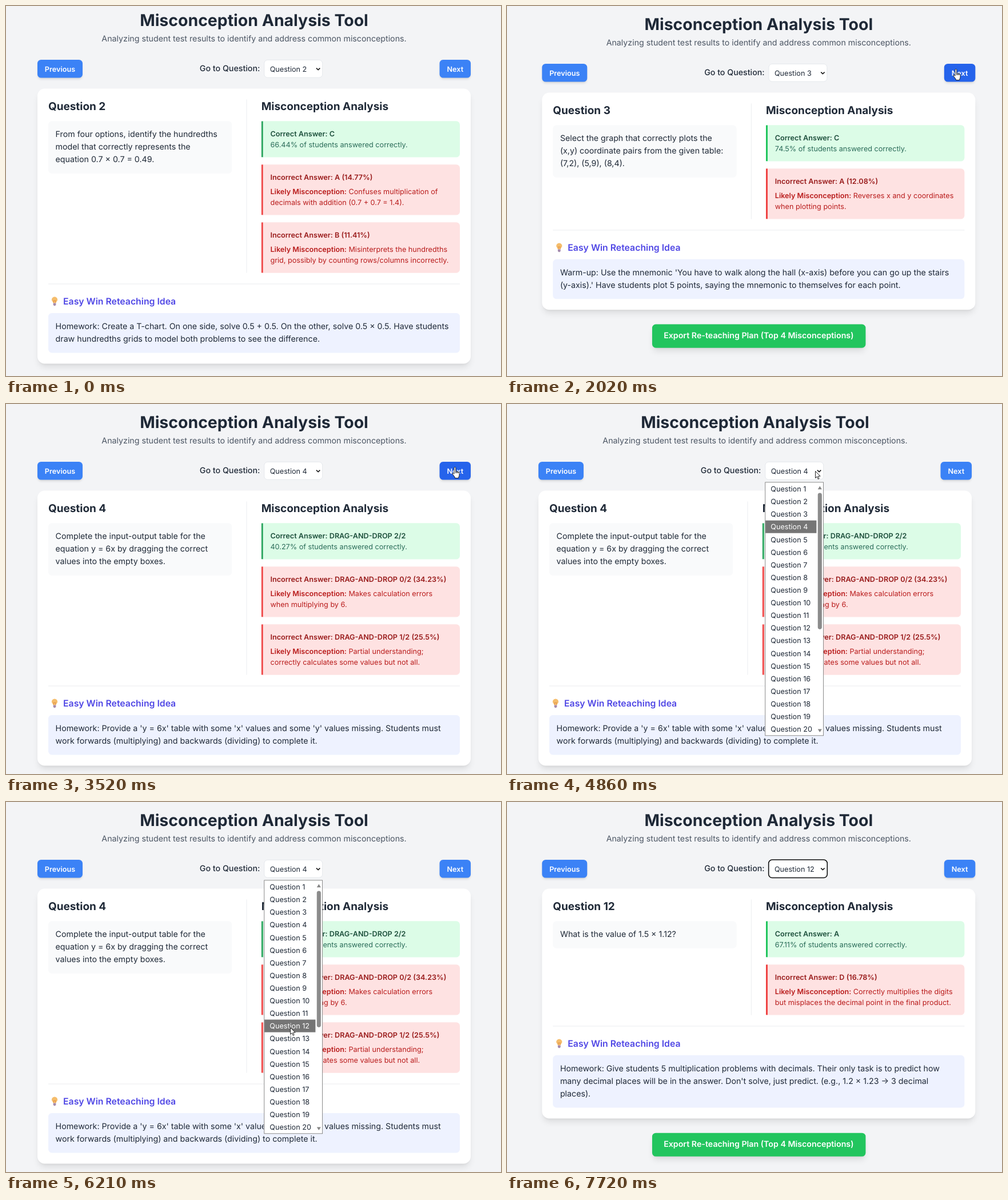
Recreate the animation shown at these times as an HTML page. Size 866x647 px, loop 8000 ms.

```html
<!DOCTYPE html>
<html lang="en">
<head>
<meta charset="utf-8">
<title>Misconception Analysis Tool</title>
<style>
* { box-sizing: border-box; margin: 0; }
html, body { width: 100%; height: 100%; overflow: hidden; }
body { position: relative; background: #f3f4f6; color: #1f2937; font: 18px/28px Inter, sans-serif; text-rendering: geometricPrecision; white-space: nowrap; }
#page { position: absolute; left: 0; top: 0; width: 960px; transform-origin: 0 0; --edge: #22c55e; }
#page.tall { --edge: #27a35c; }
h1 { font-size: 36px; line-height: 40px; text-align: center; }
.sub { margin: 8px 0 32px; text-align: center; color: #4b5563; }
nav { position: relative; height: 40px; margin-bottom: 24px; }
nav > * { position: absolute; top: 0; height: 40px; line-height: 40px; }
.btn { border-radius: 8px; background: #3b82f6; color: #fff; font-size: 16px; font-weight: 600; text-align: center; box-shadow: 0 4px 6px -1px #0000001a, 0 2px 4px -2px #0000001a; }
.btn.hover { background: #2563eb; }
.label { right: 467px; font-weight: 500; }
.select { left: 502px; width: 130px; padding-left: 12px; border: 1px solid #e0e3e8; border-radius: 8px; background: #fff; font-size: 16px; line-height: 38px; }
.select.focus { outline: 2px solid #111; outline-offset: -1px; }
.select svg { position: absolute; right: 3px; top: 15px; }
.card { padding: 24px; border-radius: 16px; background: #fff; box-shadow: 0 10px 15px -3px #0000001a, 0 4px 6px -4px #0000001a; }
.cols { display: grid; grid-template-columns: 440px 440px; gap: 32px; }
.left { padding-right: 32px; border-right: 1px solid #e5e7eb; }
h2 { margin-bottom: 16px; font-size: 24px; line-height: 32px; }
.box { padding: 16px; border-radius: 8px; background: #f9fafb; }
.answer { padding: 16px; border-left: 4px solid #ef4444; border-radius: 0 8px 8px 0; background: #fee2e2; color: #b91c1c; font-size: 16px; line-height: 24px; }
.answer + .answer { margin-top: 16px; }
.answer b { font-weight: 600; }
.answer .title { margin-bottom: 8px; color: #991b1b; font-weight: 600; }
.answer.right { border-color: var(--edge); background: #dcfce7; color: #2a6b58; }
.answer.right .title { margin: 0; color: #1d4f3c; }
.idea { margin-top: 24px; padding-top: 24px; border-top: 1px solid #e5e7eb; }
h3 { position: relative; margin-bottom: 12px; padding-left: 33px; color: #4f46e5; font-size: 20px; font-weight: 600; }
h3 svg { position: absolute; left: 6px; top: 3px; }
.idea .box { background: #eef2ff; }
.export { width: 473px; height: 52px; margin: 32px auto; border-radius: 8px; background: #22c55e; color: #fff; font-weight: 600; line-height: 52px; text-align: center; box-shadow: 0 10px 15px -3px #0000001a, 0 4px 6px -4px #0000001a; }
#list { position: absolute; left: 501.5px; top: 152.5px; width: 130.5px; height: 562px; border: 1px solid #6b6b6b; background: #fff; font-size: 16px; }
#list p { width: 113px; padding-left: 12px; }
#list p.on { background: #757575; color: #fff; }
#list svg { position: absolute; right: 0; top: 0; }
#cursor { position: absolute; left: 0; top: 0; overflow: visible; }
</style>
</head>
<body>
<div id="page"></div>
<svg id="cursor" width="1" height="1">
  <circle id="spot" r="10" cy="2" fill="#eadc32" opacity=".65"/>
  <g stroke="#222" fill="#fff" stroke-linejoin="round">
    <path id="arrow" d="M.5.5V12.5l2.8-2.6 1.9 4.4 1.9-.8-1.9-4.3h3.9z"/>
    <path id="hand" transform="translate(-5)" d="M4 1.8a1.4 1.4 0 0 1 2.8 0V8q1-.6 2 .3q1.2-.5 2 .5q2-.3 2.2 1.4v4.3q-.2 2-1.2 3.2v1.8H5.3v-1.5L1 12.3q-.5-1.8 1.2-1.6L4 12.2zM6.8 8v3M8.8 8.3V11M10.8 8.8V11"/>
  </g>
</svg>
<script>
const STEP = 167.7, LOOP = 8000, SCALE = 0.7896;
const $ = id => document.getElementById(id);

const views = [
  { from: 0, n: 2, x: 55, y: 8.7,
    question: 'From four options, identify the hundredths<br>model that correctly represents the<br>equation 0.7 × 0.7 = 0.49.',
    right: ['C', '66.44%'],
    wrong: [['A (14.77%)', 'Confuses multiplication of<br>decimals with addition (0.7 + 0.7 = 1.4).'],
            ['B (11.41%)', 'Misinterprets the hundredths<br>grid, possibly by counting rows/columns incorrectly.']],
    idea: 'Homework: Create a T-chart. On one side, solve 0.5 + 0.5. On the other, solve 0.5 × 0.5. Have students<br>draw hundredths grids to model both problems to see the difference.' },
  { from: 12, n: 3, x: 61.3, y: 15.7,
    question: 'Select the graph that correctly plots the<br>(x,y) coordinate pairs from the given table:<br>(7,2), (5,9), (8,4).',
    right: ['C', '74.5%'],
    wrong: [['A (12.08%)', 'Reverses x and y coordinates<br>when plotting points.']],
    idea: "Warm-up: Use the mnemonic 'You have to walk along the hall (x-axis) before you can go up the stairs<br>(y-axis).' Have students plot 5 points, saying the mnemonic to themselves for each point." },
  { from: 21, n: 4, x: 55, y: 15.7,
    question: 'Complete the input-output table for the<br>equation y = 6x by dragging the correct<br>values into the empty boxes.',
    right: ['DRAG-AND-DROP 2/2', '40.27%'],
    wrong: [['DRAG-AND-DROP 0/2 (34.23%)', 'Makes calculation errors<br>when multiplying by 6.'],
            ['DRAG-AND-DROP 1/2 (25.5%)', 'Partial understanding;<br>correctly calculates some values but not all.']],
    idea: "Homework: Provide a 'y = 6x' table with some 'x' values and some 'y' values missing. Students must<br>work forwards (multiplying) and backwards (dividing) to complete it." },
  { from: 39, n: 12, x: 61.3, y: 15.7, focus: true,
    question: 'What is the value of 1.5 × 1.12?',
    right: ['A', '67.11%'],
    wrong: [['D (16.78%)', 'Correctly multiplies the digits<br>but misplaces the decimal point in the final product.']],
    idea: "Homework: Give students 5 multiplication problems with decimals. Their only task is to predict how<br>many decimal places will be in the answer. Don't solve, just predict. (e.g., 1.2 × 1.23 → 3 decimal<br>places)." },
];

const chevron = '<svg width="12" height="10"><path d="M2 2.5l4 4 4-4" fill="none" stroke="#111" stroke-width="2"/></svg>';
const bulb = `<svg width="16" height="22"><path d="M8 1a6.5 6.5 0 0 0-6.5 6.5C1.5 10.5 4.6 11.500 5 15h6c.4-3.500 3.500-4.500 3.500-7.500A6.500 6.500 0 0 0 8 1z" fill="#f5bd6c"/>
  <path d="M6 14V9l2 1 2-1v5" fill="none" stroke="#e08b3c"/><path d="M5 15h6v4l-2 2H7l-2-2z" fill="#a58bad"/></svg>`;
const bars = `<svg width="15" height="560"><path d="M3 15l4.500-7 4.500 7zM3 546l4.500 7 4.500-7z" fill="#858585"/>
  <rect x="3" y="23" width="9" height="302" rx="4.500" fill="#8b8b8b"/></svg>`;

const answer = (cls, title, body) => `<div class="answer ${cls}"><p class="title">${title}</p><p>${body}</p></div>`;

const dropdown = active => '<div id="list">' + Array.from({ length: 20 }, (_, i) =>
  `<p class="${i + 1 === active ? 'on' : ''}">Question ${i + 1}</p>`).join('') + bars + '</div>';

const pageHTML = (v, hover, active) => `
  <h1>Misconception Analysis Tool</h1>
  <p class="sub">Analyzing student test results to identify and address common misconceptions.</p>
  <nav>
    <div class="btn" style="left:0;width:100px">Previous</div>
    <div class="label">Go to Question:</div>
    <div class="select ${v.focus ? 'focus' : ''}">Question ${v.n}${chevron}</div>
    <div class="btn ${hover ? 'hover' : ''}" style="right:0;width:69px">Next</div>
  </nav>
  <div class="card">
    <div class="cols">
      <div class="left"><h2>Question ${v.n}</h2><p class="box">${v.question}</p></div>
      <div><h2>Misconception Analysis</h2>
        ${answer('right', 'Correct Answer: ' + v.right[0], v.right[1] + ' of students answered correctly.')}
        ${v.wrong.map(([t, b]) => answer('', 'Incorrect Answer: ' + t, '<b>Likely Misconception:</b> ' + b)).join('')}
      </div>
    </div>
    <div class="idea"><h3>${bulb}Easy Win Reteaching Idea</h3><p class="box">${v.idea}</p></div>
  </div>
  <div class="export">Export Re-teaching Plan (Top 4 Misconceptions)</div>
  ${active ? dropdown(active) : ''}`;

// Pointer moves: first step, last step, start, end, easing.
const easeOut = u => 1 - (1 - u) ** 2;
const smooth = u => u * u * (3 - 2 * u);
const moves = [
  [1, 7, [856, 632], [785, 110], easeOut],
  [24, 28, [785, 110], [539, 117], smooth],
  [30, 37, [539, 117], [497, 394], smooth],
  [42, 45, [497, 394], [845, 503], smooth],
];

function pointerAt(k) {
  const [a, b, p, q, ease] = moves.findLast(m => k >= m[0]) || moves[0];
  const u = ease(Math.min(1, Math.max(0, (k - a) / (b - a))));
  return p.map((c, i) => c + (q[i] - c) * u);
}

const show = (id, on) => $(id).style.display = on ? '' : 'none';

function render(k) {
  const v = views.findLast(w => k >= w.from);
  const [x, y] = pointerAt(k);
  const hover = x > 758 && x < 820 && y > 93 && y < 133;
  const row = Math.floor((y - 136.5) / 22.1) + 1;
  const active = k >= 29 && k < 39 ? (row < 1 ? v.n : row) : 0;

  $('page').className = v.wrong.length > 1 ? 'tall' : '';
  $('page').style.transform = `translate(${v.x}px,${v.y}px) scale(${SCALE})`;
  $('page').innerHTML = pageHTML(v, hover, active);

  const hand = k >= 8 && k < 25;
  show('cursor', k >= 1 && k < 46);
  show('hand', hand);
  show('arrow', !hand);
  show('spot', k === 11 || k === 20);
  $('cursor').style.transform = `translate(${x}px,${y}px)`;
}

let last = -1;
function tick() {
  const k = Math.floor((performance.now() % LOOP + 5) / STEP);
  if (k !== last) render(last = k);
  requestAnimationFrame(tick);
}
tick();
</script>
</body>
</html>
```
